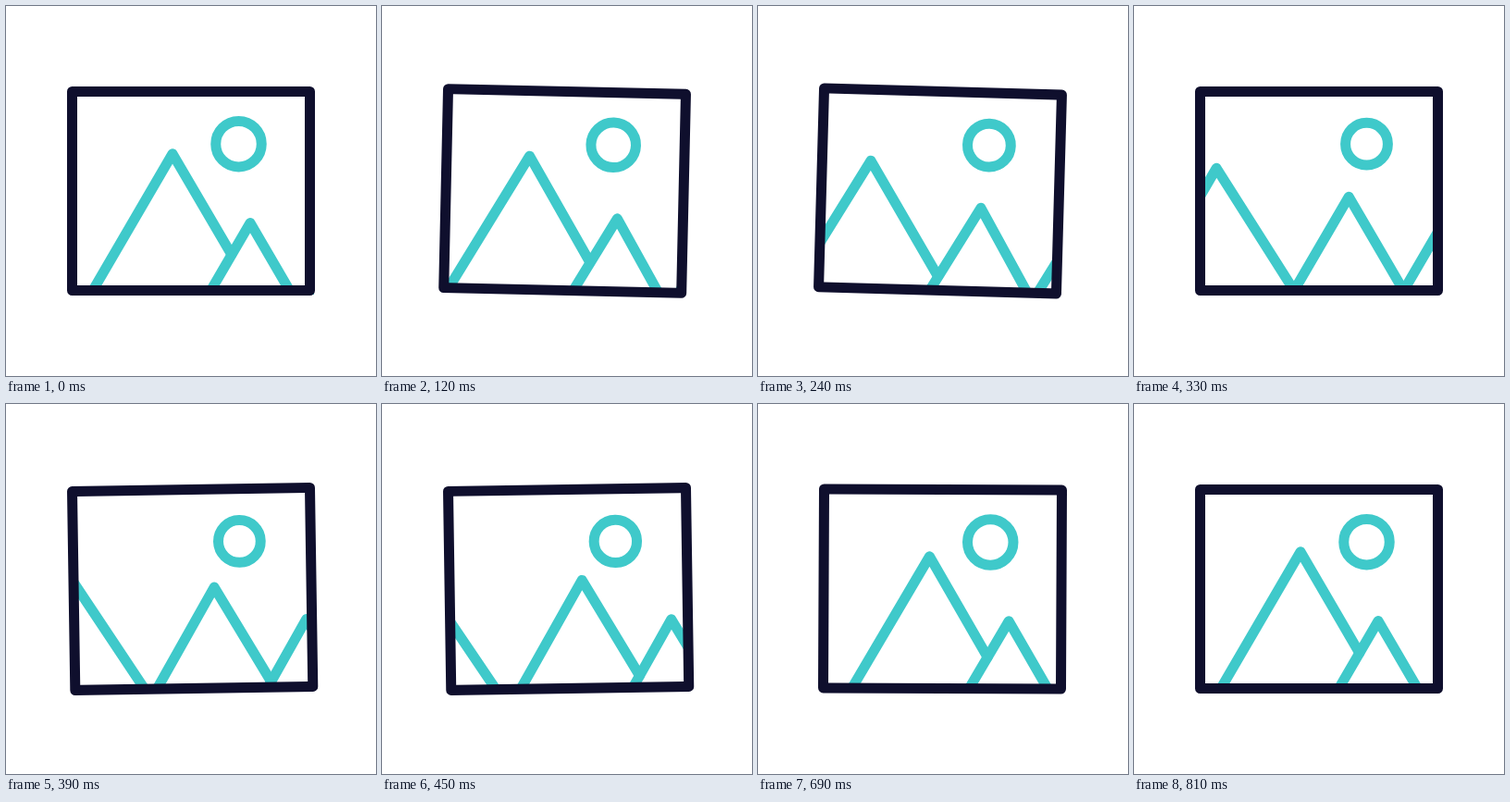
Recreate the animation shown at these times as an HTML page with a canvas. Size 400 by 400 pixels, loop 2870 ms.

```html
<!DOCTYPE html>
<html lang="en">
<head>
<meta charset="utf-8">
<title>Picture icon</title>
<style>
  html, body { margin: 0; width: 100%; height: 100%; overflow: hidden; background: #fff; }
  canvas { display: block; width: 400px; height: 400px; }
</style>
</head>
<body>
<canvas id="stage" width="400" height="400"></canvas>
<script>
const ctx = document.getElementById('stage').getContext('2d');
const LOOP = 2870, STEP = 30, LENGTH = 800;
const NAVY = '#0f0f2d', TEAL = '#3fc9ca';
const SLOPE = 1.715, FLOOR = 340;
const PIVOT = { x: 200, y: 92 };

const mix = (a, b, p) => a + (b - a) * p;
const smooth = u => u * u * (3 - 2 * u);

// Keys are [time, value] pairs, eased in and out between neighbours.
function track(keys, t) {
  for (let i = 1; i < keys.length; i++) {
    const [t0, v0] = keys[i - 1], [t1, v1] = keys[i];
    if (t < t1) return mix(v0, v1, smooth((t - t0) / (t1 - t0)));
  }
  return keys[keys.length - 1][1];
}

const TILT = [[0, 0], [195, 1.9], [418, -1], [590, 0.5], [LENGTH, 0]];
const SUN = [[0, 24.75], [370, 22.85], [660, 24.75]];

function line(points) {
  ctx.beginPath();
  points.forEach(([x, y]) => ctx.lineTo(x, y));
  ctx.stroke();
}

// A peak with its left leg running below the frame and a given right foot.
function mountain(x, y, foot) {
  const reach = (FLOOR - y) / SLOPE;
  line([[x - reach, FLOOR], [x, y], foot || [x + reach, FLOOR]]);
}

function drawMountains(t) {
  const u = Math.min(t / LENGTH, 1);
  const p = mix(smooth(u), u, 0.2);

  const ax = 180 - 240 * p, ay = 159.8 + 41 * p;
  const bx = mix(264, 180, p), by = mix(234.5, 159.8, p);
  const cx = mix(377, 264, p), cy = 234.5;

  // The middle right leg stops where it meets the next mountain.
  const fx = (bx + cx) / 2 + (cy - by) / (2 * SLOPE);
  const fy = by + SLOPE * (fx - bx);

  mountain(ax, ay, [243.7 - 190 * p, 268.5 + 98 * p]);
  mountain(bx, by, [fx, fy]);
  mountain(cx, cy);
}

function draw(t) {
  ctx.fillStyle = '#fff';
  ctx.fillRect(0, 0, 400, 400);
  ctx.save();
  ctx.lineWidth = 11;
  ctx.lineJoin = ctx.lineCap = 'round';

  ctx.translate(PIVOT.x, PIVOT.y);
  ctx.rotate(track(TILT, t) * Math.PI / 180);
  ctx.translate(-PIVOT.x, -PIVOT.y);

  ctx.strokeStyle = TEAL;
  ctx.save();
  ctx.beginPath();
  ctx.rect(67, 88, 266, 224);
  ctx.clip();
  drawMountains(t);
  ctx.restore();

  ctx.beginPath();
  ctx.arc(251.5, 149.2, track(SUN, t), 0, Math.PI * 2);
  ctx.stroke();

  ctx.strokeStyle = NAVY;
  ctx.strokeRect(71.5, 92.5, 257, 215);
  ctx.restore();
}

const start = performance.now();
function tick() {
  const t = (performance.now() - start) % LOOP;
  draw(Math.floor(t / STEP) * STEP);
  requestAnimationFrame(tick);
}
tick();
</script>
</body>
</html>
```
